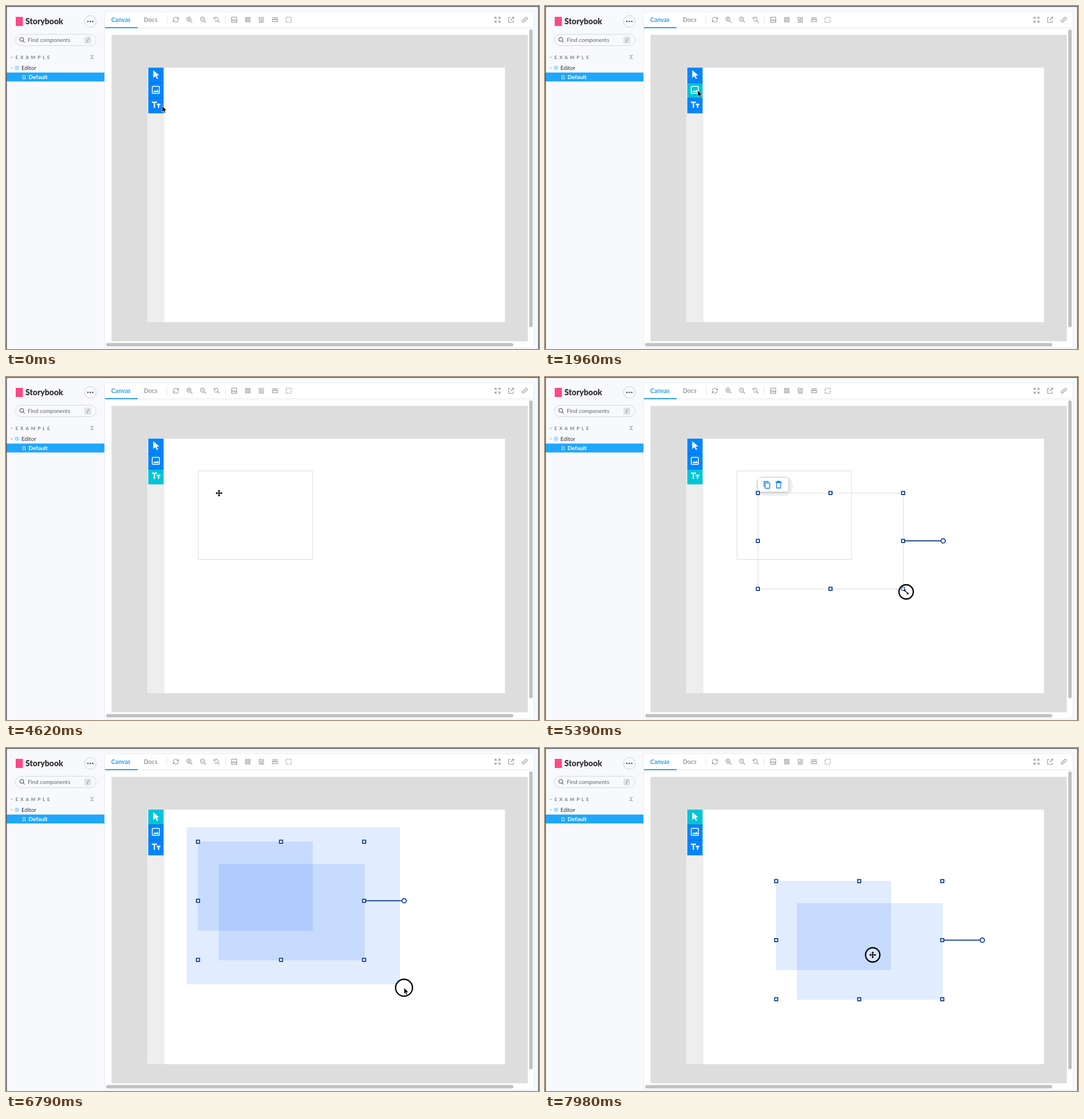
Write an HTML page that moves like this. It is 932 px wide and 601 px high and loops after 8 s.

```html
<!DOCTYPE html>
<html lang="en">
<head>
<meta charset="utf-8">
<title>Editor</title>
<style>
  html, body { margin: 0; width: 100%; height: 100%; overflow: hidden; background: #f8f9fd; }
  svg { display: block; }
  text { font-family: Lato, sans-serif; font-size: 9.8px; fill: #333; }
  .bold { font-weight: 700; }
  .icon { fill: none; stroke: #999; stroke-width: 1.1; }
  .white { fill: none; stroke: #fff; stroke-width: 1.5; }
  .blue { fill: none; stroke: #0a7cf0; stroke-width: 1.3; }
  .handle { fill: #fff; stroke: #06368f; stroke-width: 1.7; }
  .shadow { filter: drop-shadow(0 1px 2px #0004); }
</style>
</head>
<body>
<svg width="932" height="601" viewBox="0 0 932 601">
  <!-- Sidebar -->
  <rect width="932" height="601" fill="#f8f9fd"/>
  <rect x="17" y="19" width="12.5" height="16" fill="#ff4785"/>
  <text x="34" y="32" style="font-size:14px;font-weight:900">Storybook</text>
  <circle cx="147.5" cy="27" r="10.3" fill="none" stroke="#ccd2d8"/>
  <path d="M143.2 27h.1m4.1 0h.1m4.1 0h.1" stroke="#444" stroke-width="2.4" stroke-linecap="round"/>
  <rect x="16.5" y="49.5" width="141" height="20" rx="10" fill="none" stroke="#d3d8dd"/>
  <g class="icon" style="stroke:#555"><circle cx="27.5" cy="58.5" r="3.3"/><path d="M30 61l2.6 2.8"/></g>
  <text x="38" y="63.3" style="fill:#666">Find components</text>
  <rect x="137" y="53.5" width="12" height="12.5" rx="2.5" fill="#dfe3e7"/>
  <text x="141" y="63" style="font-size:9px;fill:#555">/</text>
  <path d="M8 89h4.4l-2.2 2.6zM8 107.5h4.4l-2.2 2.6z" fill="#bbb"/>
  <text x="16.5" y="93" style="font-size:8px;font-weight:900;letter-spacing:3.8px;fill:#8b9197">EXAMPLE</text>
  <path class="icon" d="M148 86l2.5 2.5 2.5-2.5M148 93l2.5-2.5 2.5 2.5"/>
  <path d="M16.5 105.5h5.5v5.5h-5.5zM16.5 108.2h5.5M19.2 105.5v5.5" fill="none" stroke="#7cc8f5"/>
  <text x="27" y="111.8">Editor</text>
  <rect x="1" y="116.600" width="171.500" height="15.600" fill="#1ea7fd"/>
  <path d="M29.500 122h4v6.300l-2-1.800-2 1.800z" fill="none" stroke="#d6f0ff"/>
  <text x="39.500" y="128.300" class="bold" style="font-size:10px;fill:#fff">Default</text>

  <!-- Preview panel -->
  <rect x="172.500" y="10" width="751" height="589" rx="3" fill="#fff" stroke="#e6eaee"/>
  <path d="M173 38.500h750" stroke="#e3e6e9"/>
  <path d="M173 38h57" stroke="#2b9fe8" stroke-width="2"/>
  <text x="184" y="27.800" class="bold" style="font-size:10.600px;fill:#2b9fe8">Canvas</text>
  <text x="241" y="27.800" class="bold" style="font-size:10.600px;fill:#999">Docs</text>
  <path d="M281.500 16v15.500M383.500 16v15.500" stroke="#e3e6e9"/>
  <g class="icon" id="icons"></g>

  <!-- Editor page -->
  <rect x="184.500" y="50.500" width="728" height="537" fill="#ddd"/>
  <rect x="247" y="108" width="30" height="446" fill="#eee"/>
  <rect x="277" y="108" width="595.500" height="446" fill="#fff"/>
  <rect x="915" y="41" width="6" height="522" rx="3" fill="#c1c1c1"/>
  <rect x="175" y="590.500" width="712" height="6" rx="3" fill="#c1c1c1"/>
  <g id="tools"></g>
  <g class="white">
    <path d="M257.500 112.500l10.500 9-4.700.4 2.600 4.800-2.100 1-2.500-4.900-3.800 3.200z" fill="#fff" stroke="none"/>
    <rect x="255.700" y="140.700" width="12.600" height="12.600" rx="1.500"/>
    <path d="M257.500 151l2.800-3.600 1.900 2.200 2.500-3.200 2.800 4.600z" fill="#fff" stroke="none"/>
    <path d="M255 168.600h9M259.500 168.600v10M263.500 172.300h6.500M266.800 172.300v6.300" stroke-width="2.200"/>
  </g>
  <g id="scene"></g>
  <path d="M0 .7h932M.7 0v601M931.300 0v601" stroke="#5a5c5f" stroke-width="1.500"/>
</svg>
<script>
const LOOP = 8000, STEP = 70;
const byId = id => document.getElementById(id);
const box = (x, y, w, h, attrs = '') => `<rect x="${x}" y="${y}" width="${w}" height="${h}" ${attrs}/>`;
const circle = (x, y, r, attrs = '') => `<circle cx="${x}" cy="${y}" r="${r}" ${attrs}/>`;
const path = (d, attrs = '') => `<path d="${d}" ${attrs}/>`;
const at = (x, y, body) => `<g transform="translate(${x} ${y})">${body}</g>`;
const repeat = (n, draw) => Array.from({ length: n }, (_, i) => draw(i)).join('');
const spin = (n, body) => repeat(n, i => `<g transform="rotate(${i * 360 / n})">${body}</g>`);

// Preview toolbar: evenly spaced icons, each drawn around its own centre
const lens = circle(-1, -1, 3.6) + path('M2 2l3 3');
const square = attrs => box(-4.5, -4.5, 9, 9, attrs);
const iconRow = (x, icons) => icons.map((body, i) => at(x + i * 23.8, 24, body)).join('');
byId('icons').innerHTML =
  iconRow(297, [
    spin(2, path('M-4.5 0A4.5 4.5 0 0 1 4-2M4.5-4.5v3h-3')),
    lens + path('M-3-1h4M-1-3v4'),
    lens + path('M-3-1h4'),
    path('M-4-3A3.6 3.6 0 1 1-4 1M-4.5-4.5v3h3M2 2l3 3')
  ]) +
  iconRow(399, [
    square() + path('M-4.5 2.5l3-3 2.500 2.500 1.500-1.500 2 2'),
    spin(4, box(1, 1, 3, 3)),
    box(-4, -4, 4, 4) + repeat(5, i => path(`M${i < 3 ? 1.5 : -4.5} ${i * 2.1 - 4}H4.500`)),
    box(-4.500, -1, 9, 4.500) + path('M-5-3.500H5') + repeat(3, i => path(`M${i * 2 - 2}-1v2`)),
    square('stroke-dasharray="3 1.500"')
  ]) +
  iconRow(859.500, [
    spin(4, path('M1.500 4.500h3v-3M1.500 1.500l3 3')),
    path('M-1-4h-3.500v8.500H4V1M1.500-4.500h3v3M4.500-4.500L-1 1'),
    spin(2, path('M-1 1.500a2.400 2.400 0 0 1 0-3L1.500-4a2.300 2.300 0 0 1 3 3L3 .7'))
  ]);

// The story: two frames are drawn, then selected together and dragged
const FIRST = { x: 336, y: 164.5, w: 200, h: 155 };
const SECOND = { x: 372.5, y: 203.5, w: 254, h: 168 };
const LAG = 5, TOOL_HEIGHT = 26.7;
const start = f => [f.x, f.y];
const end = f => [f.x + f.w + LAG, f.y + f.h + LAG];
const tool = i => [267, 121 + i * TOOL_HEIGHT];
const MARQUEE = [322, 145], GRAB = [504.5, 293.5], DROP = [573, 362.5];

// Pointer moves: start time, end time, destination
const MOVES = [
  [0, 770, [259, 150]], [840, 1080, [306, 158]],
  [1330, 1750, tool(1)], [2240, 2450, start(FIRST)], [2520, 2920, end(FIRST)],
  [3290, 3780, tool(2)], [4200, 4410, start(SECOND)], [4830, 5390, end(SECOND)],
  [5670, 6230, MARQUEE], [6480, 6810, [700, 423]],
  [7280, 7490, GRAB], [7700, 7980, DROP]
];
const PRESS = {
  image: [1820, 1960], first: [2520, 3080], text: [3850, 3990],
  second: [4690, 5460], marquee: [6300, 7070], drag: [7630, LOOP]
};
const within = (t, [from, to]) => t >= from && t < to;
const down = name => PRESS[name][0], up = name => PRESS[name][1];

function pointer(t) {
  let x = 273, y = 175;
  for (const [from, to, [toX, toY]] of MOVES) {
    const k = Math.min(1, Math.max(0, (t - from) / (to - from)));
    const eased = k * k * (3 - 2 * k);
    x += (toX - x) * eased;
    y += (toY - y) * eased;
  }
  return [x, y];
}

// A frame grows behind the pointer until it reaches its full size
const drawn = ({ x, y, w, h }, px, py, done) => ({
  x, y,
  w: done ? w : Math.max(0, px - LAG - x),
  h: done ? h : Math.max(0, py - LAG - y)
});

function bounds(frames) {
  const x = Math.min(...frames.map(f => f.x)), y = Math.min(...frames.map(f => f.y));
  return {
    x, y,
    w: Math.max(...frames.map(f => f.x + f.w)) - x,
    h: Math.max(...frames.map(f => f.y + f.h)) - y
  };
}

function selection({ x, y, w, h }) {
  let out = path(`M${w} ${h / 2}h70`, 'stroke="#06368f" stroke-width="1.700"') +
    circle(w + 70, h / 2, 3.800, 'class="handle"');
  for (const i of [0, .5, 1]) for (const j of [0, .5, 1])
    if (i !== .5 || j !== .5) out += box(w * i - 2.700, h * j - 2.700, 5.400, 5.400, 'class="handle"');
  return at(x - .3, y - .3, out);
}

const actions = ({ x, y }) => at(x, y,
  box(-3, -30, 64, 35, 'rx="16" fill="#f0f0f0"') +
  box(0, -26.500, 53, 24, 'rx="2" fill="#fff" class="shadow"') +
  '<g class="blue">' + box(12.500, -18, 8, 9.500, 'rx="1"') + path('M10.500-11v-9.500h8') +
  path('M32.500-18.500v9.500h7v-9.500zM30.500-19.500h11M34-21h4') + '</g>');

const arm = path('M0 0V-5', 'stroke="#000" stroke-width="1.500"') + path('M0-6l2.300 2.800h-4.600z');
const CURSORS = {
  arrow: path('M0 0V11L2.500 8.700 4.200 12.700 6.100 11.900 4.500 8H8Z', 'stroke="#fff" stroke-width=".7"'),
  move: spin(4, arm),
  resize: `<g transform="rotate(-45)">${spin(2, arm)}</g>`
};

function activeTool(t) {
  if (t < up('image')) return -1;
  if (t < up('first')) return 1;
  return within(t, [up('text'), up('second')]) ? 2 : 0;
}

function render(t) {
  const [px, py] = pointer(t), [lastX] = pointer(t - STEP);
  const active = activeTool(t);
  byId('tools').innerHTML = repeat(3, i => at(248.800, 108 + i * TOOL_HEIGHT,
    box(0, 0, 26.700, TOOL_HEIGHT, `fill="${i === active ? '#00c4d8' : '#0085ff'}"`) +
    (i ? path('M0 0h26.700', 'stroke="#0068d0"') : '')));

  const frames = [];
  if (t >= down('first')) frames.push(drawn(FIRST, px, py, t >= up('first')));
  if (t >= down('second') + STEP) frames.push(drawn(SECOND, px, py, t >= up('second')));
  if (t >= down('drag')) for (const f of frames) {
    f.x += px - GRAB[0];
    f.y += py - GRAB[1];
  }

  const tint = 'rgba(0,92,255,.118)', grouped = t >= 6650;
  const look = grouped ? `fill="${tint}" stroke="#0000000d"` : 'fill="none" stroke="#dcdcdc"';
  let out = frames.map(f => box(f.x, f.y, f.w, f.h, look)).join('');
  const single = within(t, [down('first'), up('text')]) ? frames[0]
    : within(t, [down('second'), down('marquee')]) ? frames[1] : null;
  if (single) out += actions(single) + selection(single);
  const selecting = within(t, PRESS.marquee);
  if (selecting && t > 6510) {
    const [x, y] = MARQUEE.map(v => v - 6);
    out += box(x, y, px - 7 - x, py - 6 - y, `fill="${tint}"`);
  }
  if (grouped) out += selection(bounds(frames));

  const resizing = within(t, [down('first') + STEP, 3290]) || within(t, [4900, 5670]);
  const hovering = frames.some(f => px > f.x && px < f.x + f.w && py > f.y && py < f.y + f.h);
  const cursor = resizing ? 'resize' : hovering && !selecting ? 'move' : 'arrow';

  // The press ring swells while an arrow pointer rests
  if (Object.values(PRESS).some(span => within(t, span))) {
    const radius = cursor !== 'arrow' ? 12.500 : px === lastX ? 22.500 : 14.800;
    out += circle(px, py, radius, 'fill="#fff5" stroke="#000" stroke-width="2.300"');
  }
  byId('scene').innerHTML = out + at(px, py, CURSORS[cursor]);
}

let shown = -1;
function tick(now) {
  const t = Math.floor(now % LOOP / STEP) * STEP;
  if (t !== shown) render(shown = t);
  requestAnimationFrame(tick);
}
tick(performance.now());
</script>
</body>
</html>
```
